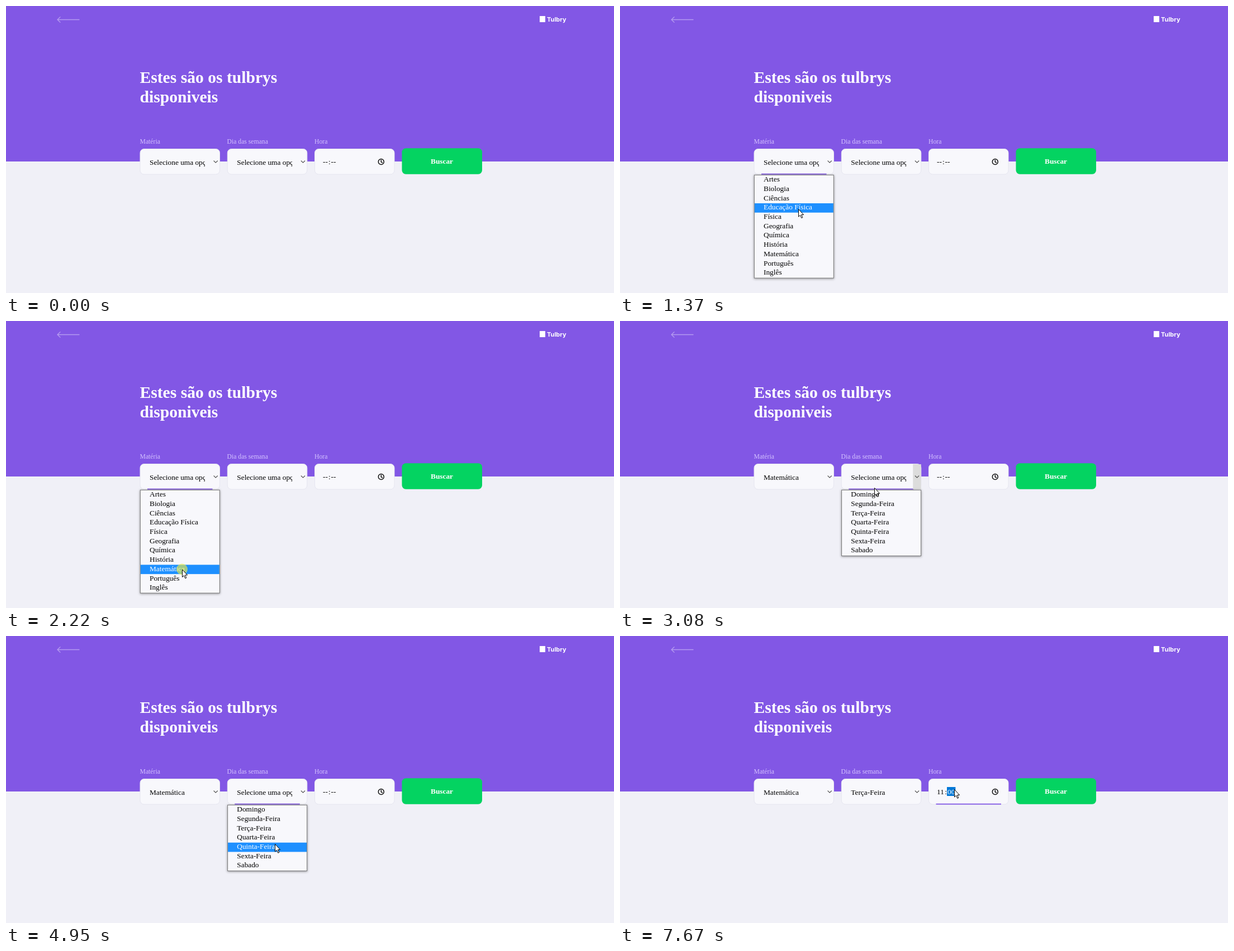
An HTML page for the animation above (8000 ms loop, 1088 by 515 pixels).

```html
<!DOCTYPE html>
<html lang="pt">
<head>
<meta charset="utf-8">
<style>
html, body { margin: 0; width: 100%; height: 100%; overflow: hidden; background: #f0f0f7; }
svg { display: block; font-family: "Liberation Serif", "Times New Roman", serif; }
#stage { width: 1088px; height: 515px; font-size: 13.33px; }
.title { font-size: 29.6px; font-weight: bold; fill: #fff; }
.label { font-size: 11.7px; fill: #d4c2ff; }
.brand { font: bold 11px Inter, sans-serif; fill: #fff; }
.line { fill: none; stroke-linecap: round; stroke-linejoin: round; }
.menu { fill: #f8f8fc; stroke: #767676; filter: drop-shadow(0 1px 2px rgba(0, 0, 0, .4)); }
</style>
</head>
<body>
<svg id="stage" viewBox="0 0 1088 515">
  <rect width="1088" height="279" fill="#8257e5"/>
  <path class="line" d="M131 24.5H92M97 19.8L92 24.5L97 29.2" stroke="#b49af0" stroke-width="1.3"/>
  <rect x="955" y="18" width="10" height="11" fill="#fff"/>
  <text class="brand" x="968" y="28">Tulbry</text>
  <text class="title" x="239.5" y="138">Estes são os tulbrys</text>
  <text class="title" x="239.5" y="173">disponiveis</text>
  <text class="label" x="239.5" y="246.5">Matéria</text>
  <text class="label" x="395.5" y="246.5">Dia das semana</text>
  <text class="label" x="552" y="246.5">Hora</text>
  <rect x="708.5" y="255.3" width="143.5" height="46.5" rx="7" fill="#04d361"/>
  <text x="780" y="283" text-anchor="middle" font-weight="bold" fill="#fff">Buscar</text>
  <g id="live"></g>
</svg>
<script>
const LOOP = 8000, ROW = 16.68, MENU_TOP = 304;
const FIELD_X = [240, 396.3, 552.5];
const PROMPT = 'Selecione uma opção';
const SUBJECTS = ['Artes', 'Biologia', 'Ciências', 'Educação Física', 'Física', 'Geografia',
  'Química', 'História', 'Matemática', 'Português', 'Inglês'];
const DAYS = ['Domingo', 'Segunda-Feira', 'Terça-Feira', 'Quarta-Feira', 'Quinta-Feira',
  'Sexta-Feira', 'Sabado'];

// Pointer path: time, x, y
const PATH = [
  [70, 782, 300], [230, 570, 255], [390, 306, 239], [620, 310, 279], [840, 311, 280],
  [920, 312, 296], [1370, 319, 364], [1690, 319, 405], [1800, 319, 405], [2140, 315, 445],
  [2300, 315, 446], [2610, 451, 288], [2690, 454, 286], [3000, 455, 288], [3080, 455, 299],
  [3450, 468, 345], [3540, 471, 357], [3900, 480, 381], [4340, 484, 393], [4490, 487, 396],
  [4880, 487, 396], [4950, 481, 373], [5020, 481, 373], [5500, 471, 335], [5580, 470, 339],
  [5900, 470, 339], [6050, 545, 300], [6180, 598, 275], [8000, 598, 275]
];
const CLICKS = [[690, 840], [2220, 2300], [2850, 3000], [5810, 5890], [6180, 6350]];

const between = (t, from, to) => t >= from && t < to;
const rect = (x, y, w, h, fill) =>
  `<rect x="${x}" y="${y}" width="${w}" height="${h}" fill="${fill}"/>`;
const text = (x, y, str, fill = '#000') => `<text x="${x}" y="${y}" fill="${fill}">${str}</text>`;

function pointerAt(t) {
  const i = PATH.findIndex(p => p[0] > t);
  if (i < 1) return PATH[i ? PATH.length - 1 : 0].slice(1);
  const [t0, x0, y0] = PATH[i - 1], [t1, x1, y1] = PATH[i];
  const k = (t - t0) / (t1 - t0);
  return [x0 + (x1 - x0) * k, y0 + (y1 - y0) * k];
}

function box(x, focused) {
  return `<rect x="${x}" y="256.5" width="142.5" height="45.5" rx="7" fill="#f8f8fc" stroke="#e6e6f0"/>` +
    (focused ? rect(x + 13, 300.7, 116.5, 1.8, '#8257e5') : '');
}

function select(x, value, focused, pressed) {
  return box(x, focused) +
    (pressed ? rect(x + 128, 257, 14.5, 45, '#dcdcdc') : '') +
    `<svg x="${x + 17}" y="258" width="99" height="42">${text(0, 26.5, value)}</svg>` +
    `<path class="line" d="M${x + 132} 278l3.2 3.2l3.2 -3.2" stroke="#555" stroke-width="1.2"/>`;
}

function menu(x, items, pointerY) {
  const hot = Math.floor((pointerY - MENU_TOP) / ROW);
  let out = `<rect class="menu" x="${x + .3}" y="303.3" width="142" height="${items.length * ROW + 1.4}"/>`;
  items.forEach((item, i) => {
    const y = MENU_TOP + i * ROW;
    if (i === hot) out += rect(x + .8, y, 141, ROW, '#1e90ff');
    out += text(x + 17, y + 11.4, item, i === hot ? '#fff' : '#000');
  });
  return out;
}

function timeField(t) {
  const hour = t < 6970 ? '--' : t < 7120 ? '01' : '11';
  const minute = t < 7670 ? '--' : '00';
  const active = t < 6180 ? -1 : t < 7120 ? 0 : 2;
  let x = 566, out = box(FIELD_X[2], t >= 6180);
  [hour, ':', minute].forEach((part, i) => {
    const pad = i === 1 ? 0 : 1;
    const width = (part === '--' ? 8.9 : part === ':' ? 3.7 : 13.33) + 2 * pad;
    if (i === active) out += rect(x, 271, width, 16, '#0078d7');
    out += text(x + pad, 284, part, i === active ? '#fff' : '#000');
    x += width;
  });
  return out + '<g class="line" stroke="#111" stroke-width="1.5">' +
    '<circle cx="671.3" cy="279.5" r="5"/><path d="M671.3 276.5V279.8L673.5 281"/></g>';
}

function render(t) {
  const [px, py] = pointerAt(t);
  let out = select(FIELD_X[0], t < 2300 ? PROMPT : 'Matemática', between(t, 690, 2850), between(t, 770, 920)) +
    select(FIELD_X[1], t < 5890 ? PROMPT : 'Terça-Feira', between(t, 2850, 6180), between(t, 2930, 3160)) +
    timeField(t);
  if (between(t, 770, 2300)) out += menu(FIELD_X[0], SUBJECTS, py);
  if (between(t, 2930, 5890)) out += menu(FIELD_X[1], DAYS, py);
  if (CLICKS.some(([from, to]) => between(t, from, to)))
    out += `<circle cx="${px}" cy="${py}" r="10" fill="#f5f03c" fill-opacity=".6"/>`;
  if (t >= 70)
    out += `<path transform="translate(${px} ${py})" d="M.5 .5V14L3.5 11.2L5.8 16.3L7.8 15.4L5.6 10.4H9.6Z" fill="#fff" stroke="#000"/>`;
  document.getElementById('live').innerHTML = out;
}

const start = performance.now();
function tick() {
  render((performance.now() - start) % LOOP);
  requestAnimationFrame(tick);
}
tick();
</script>
</body>
</html>
```
